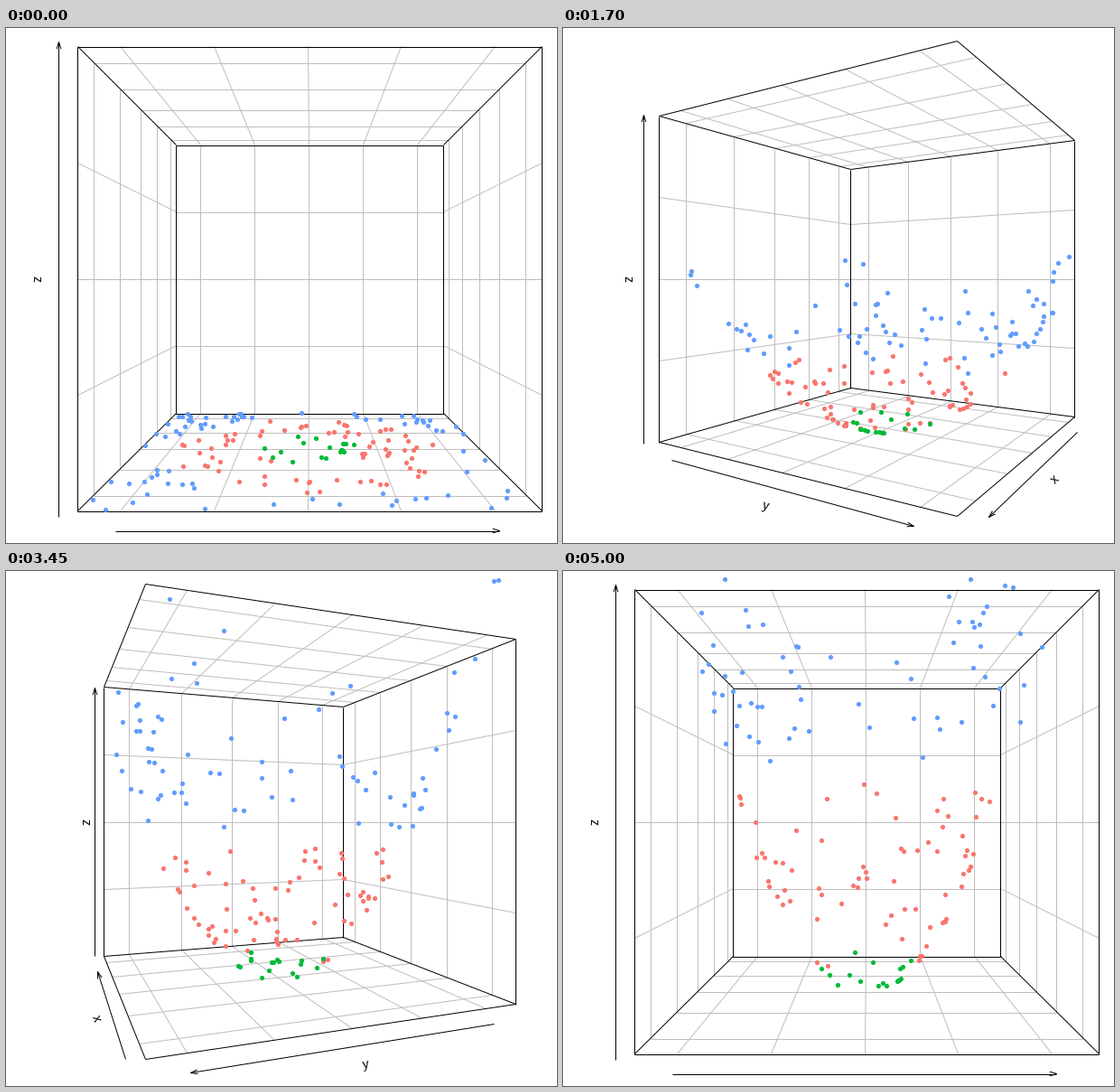
These frames come from a looping animation (610 px wide and 570 px high, 5050 ms). A matplotlib script:

```python
import numpy as np
import matplotlib.pyplot as plt
from matplotlib.animation import FuncAnimation
from matplotlib.collections import LineCollection, PolyCollection

W, H, DPI = 610, 570, 100
FRAMES, STEP_MS = 101, 50
PX = 72 / DPI                       # one pixel in points
VIEW_W, VIEW_H = 514, 526           # room for the box
MID_X, MID_Y = 336.6, 277.8
EYE = 2 + np.sqrt(3)                # eye distance from the box centre
X_LIM, Y_LIM = (-2.45, 2.50), (-2.50, 2.44)
Z_TOP = 6.25
TICK, LABEL = 0.06, 0.12            # outward shift of arrows and labels


def scatter_ring(rng, n, r_min, r_max):
    """Uniform random points of the square that lie inside a ring."""
    xy = rng.uniform((X_LIM[0], Y_LIM[0]), (X_LIM[1], Y_LIM[1]), (4000, 2))
    r = np.hypot(*xy.T)
    return xy[(r > r_min) & (r < r_max)][:n]


def unit(v, lim):
    return (2 * np.asarray(v, float) - lim[0] - lim[1]) / (lim[1] - lim[0])


rng = np.random.default_rng(12)
GROUPS = [
    ("#619CFF", scatter_ring(rng, 76, 2.1, 4)),
    ("#F8766D", scatter_ring(rng, 71, .78, 1.94)),
    ("#00BA38", scatter_ring(rng, 17, 0, .76)),
]

TICKS_X = unit(np.arange(-2, 3), X_LIM)
TICKS_Y = unit(np.arange(-2, 3), Y_LIM)
TICKS = [TICKS_X, TICKS_Y, np.array([-.5, 0, .5])]
CORNERS = np.array([(x, y) for y in (-1, 1) for x in (-1, 1)], float)
BOX = np.array([(x, y, z) for x, y in CORNERS for z in (-1, 1)])


class View:
    """Perspective of the turned box, fitted to the stage."""

    def __init__(self, theta):
        self.cos, self.sin = np.cos(theta), np.sin(theta)
        self.scale, self.shift = 1, np.zeros(2)
        box = self(BOX)
        lo, hi = box.min(0), box.max(0)
        self.scale = min(VIEW_W / (hi - lo)[0], VIEW_H / (hi - lo)[1])
        self.shift = np.array([MID_X, MID_Y]) - self.scale * (lo + hi) / 2

    def __call__(self, pts):
        x, y, z = np.asarray(pts, float).T
        w = EYE - (x * self.sin - y * self.cos)
        flat = np.column_stack([(x * self.cos + y * self.sin) / w, -z / w])
        return flat * self.scale + self.shift

    def pixels(self, pts):
        """Projected points moved to pixel centres, for crisp lines."""
        return np.floor(np.round(self(pts), 6)) + (.499, .501)

    def faces(self):
        """Faces seen from inside, as (axis, side)."""
        eye = EYE * self.sin, -EYE * self.cos
        walls = [(a, s) for a in (0, 1) for s in (-1, 1) if s * eye[a] < 1]
        return walls + [(2, -1), (2, 1)]


def face_point(axis, side, a, b):
    p = [a, b]
    p.insert(axis, side)
    return tuple(p)


def face_outline(axis, side):
    return [face_point(axis, side, a, b)
            for a, b in [(-1, -1), (1, -1), (1, 1), (-1, 1)]]


def face_grid(axis, side):
    u, v = [TICKS[i] for i in range(3) if i != axis]
    return ([[face_point(axis, side, t, e) for e in (-1, 1)] for t in u]
            + [[face_point(axis, side, e, t) for e in (-1, 1)] for t in v])


def shared_edges(outlines):
    """Every edge of the given faces once."""
    return sorted({tuple(sorted(pair)) for o in outlines
                   for pair in zip(o, o[1:] + o[:1])})


def axis_specs(view):
    """For each axis: start, end and outward direction."""
    floor = np.round(view(np.column_stack([CORNERS, -np.ones(4)])), 6)
    fx, fy = CORNERS[np.argmax(floor[:, 1])]
    zx, zy = CORNERS[np.argmin(floor[:, 0])]
    return [
        ((TICKS_X[0], fy, -1), (TICKS_X[-1], fy, -1), (0, fy, -1)),
        ((fx, TICKS_Y[0], -1), (fx, TICKS_Y[-1], -1), (fx, 0, -1)),
        ((zx, zy, -1), (zx, zy, 1), (zx, zy, 0)),
    ]


def arrow_head(tail, tip, length=8, spread=np.radians(17)):
    dx, dy = tip - tail
    back = np.arctan2(dy, dx) + np.pi
    wings = [tip + length * np.array([np.cos(back + s), np.sin(back + s)])
             for s in (-spread, spread)]
    return np.array([wings[0], tip, wings[1]])


def label_angle(a, b):
    dx, dy = b - a
    if abs(dx) < 1e-6:
        return 270
    return np.degrees(np.arctan2(-dy if dx > 0 else dy, abs(dx)))


def text_down(angle, dist=2):
    """Step towards the foot of text turned by the angle."""
    t = np.radians(angle)
    return dist * np.array([np.sin(t), np.cos(t)])


fig = plt.figure(figsize=(W / DPI, H / DPI), dpi=DPI, facecolor="white")
ax = fig.add_axes([0, 0, 1, 1])
ax.set(xlim=(0, W), ylim=(H, 0))
ax.axis("off")


def add_lines(color, order):
    lines = LineCollection([], colors=color, linewidths=PX, zorder=order)
    return ax.add_collection(lines, autolim=False)


arrows = add_lines("black", 1)
labels = [ax.text(0, 0, s, family="Liberation Sans", size=14 * PX,
                  ha="center", va="center", zorder=1) for s in "xyz"]
panels = ax.add_collection(
    PolyCollection([], facecolors="white", edgecolors="none",
                   antialiaseds=False, zorder=2), autolim=False)
grid = add_lines("#BEBEBE", 3)
edges = add_lines("black", 4)
dots = [ax.plot([], [], "o", color=c, ms=5.2 * PX, mew=0, zorder=5)[0]
        for c, _ in GROUPS]


def draw(k):
    grow = k / (FRAMES - 1)
    view = View(2 * np.pi * grow)

    strokes = []
    for label, (start, end, out) in zip(labels, axis_specs(view)):
        start, end, out = map(np.array, (start, end, out))
        a, b = view.pixels([start + TICK * out, end + TICK * out])
        strokes += [np.array([a, b]), arrow_head(a, b)]
        angle = label_angle(a, b)
        spot = view([(start + end) / 2 + LABEL * out])[0]
        label.set_position(spot + text_down(angle))
        label.set_rotation(angle)
    arrows.set_segments(strokes)

    faces = view.faces()
    outlines = [face_outline(*f) for f in faces]
    panels.set_verts([view(o) for o in outlines])
    edges.set_segments([view.pixels(e) for e in shared_edges(outlines)])
    grid.set_segments([view.pixels(s) for f in faces for s in face_grid(*f)])

    for dot, (_, pts) in zip(dots, GROUPS):
        x, y = pts.T
        z = 2 * grow * (x ** 2 + y ** 2) / Z_TOP - 1
        flat = view(np.column_stack([unit(x, X_LIM), unit(y, Y_LIM), z]))
        dot.set_data(*flat.T)
    return [arrows, panels, grid, edges, *dots, *labels]


anim = FuncAnimation(fig, draw, frames=FRAMES, interval=STEP_MS,
                     init_func=lambda: draw(0), repeat=True, repeat_delay=0)
plt.show()
```
